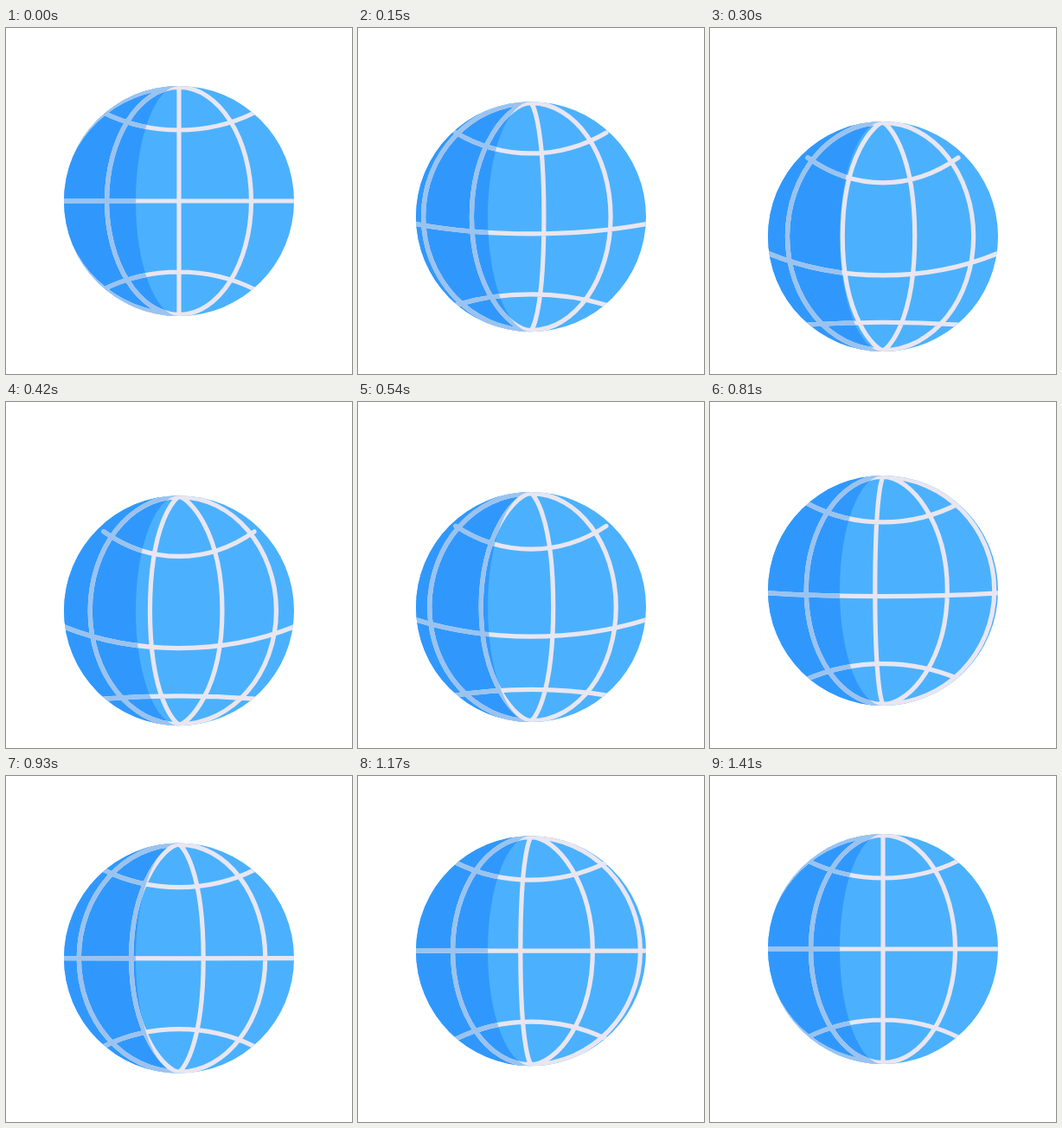
Write an HTML page that moves like this. It is 400 px wide and 400 px high and loops after 3.47 s.

```html
<!DOCTYPE html>
<html lang="en">
<head>
<meta charset="utf-8">
<title>Spinning globe</title>
<style>
  html, body { margin: 0; width: 100%; height: 100%; overflow: hidden; background: #fff; }
  svg { display: block; width: 100%; height: 100%; }
</style>
</head>
<body>
<svg viewBox="0 0 400 400">
  <defs>
    <path id="shade" d="M0-133A133 133 0 0 0 0 133A50 133 0 0 1 0-133Z"/>
    <path id="grid" fill="none" stroke-width="5.2" stroke-linecap="round"/>
    <clipPath id="disc"><circle r="133"/></clipPath>
    <clipPath id="dark"><use href="#shade"/></clipPath>
  </defs>
  <g id="globe">
    <circle r="133" fill="#4bb1fe"/>
    <use href="#shade" fill="#3098fd"/>
    <g clip-path="url(#disc)"><use href="#grid" stroke="#e9e6f1"/></g>
    <g clip-path="url(#dark)"><use href="#grid" stroke="#9ac3f0"/></g>
  </g>
</svg>
<script>
const LOOP = 3470, STEP = 30, DROP_END = 330, PUSH_END = 360, TILT_END = 960, END = 1410;
const PUSH = 0.475, TURNS = 4; // travel in meridian spacings
const globe = document.getElementById('globe');
const grid = document.getElementById('grid');

const clamp = v => Math.min(1, Math.max(0, v));
const span = (t, from, to) => clamp((t - from) / (to - from));
const smooth = u => u * u * (3 - 2 * u);

// Cubic-bezier easing with control points (x1, 0) and (x2, 1)
function ease(u, x1, x2) {
  let lo = 0, hi = 1;
  for (let i = 0; i < 24; i++) {
    const s = (lo + hi) / 2, r = 1 - s;
    const x = 3 * r * r * s * x1 + 3 * r * s * s * x2 + s * s * s;
    if (x < u) lo = s; else hi = s;
  }
  return smooth((lo + hi) / 2);
}

// Horizontal reach of a meridian, u in spacings from the centre
function reach(u) {
  const a = Math.abs(u), d = a - 1;
  return Math.sign(u) * (d <= 0 ? a * 83.5 : 83.5 + 48 * d + 5 * d ** 6);
}

// Narrow meridians meet in a point at the poles, wide ones are elliptical
function meridian(u) {
  const x = reach(u), ry = 131.5, near = Math.min(1, Math.abs(u));
  const h = 0.552 * x * near * near;
  const v = ry * (0.552 + 0.4 * (1 - near));
  return `M0 ${-ry}C${h} ${-ry} ${x} ${-v} ${x} 0C${x} ${v} ${h} ${ry} 0 ${ry}`;
}

function parallel(half, edge, mid) {
  const c = edge + (mid - edge) * 4 / 3, k = half * 0.38;
  return `M${-half} ${edge}C${-k} ${c} ${k} ${c} ${half} ${edge}`;
}

function draw(t) {
  const rise = smooth(span(t, 0, DROP_END));
  const drop = 42 * (rise - ease(span(t, DROP_END, END), 0.36, 0.39));
  const tilt = 1.02 * (rise - smooth(span(t, DROP_END, TILT_END)));
  const travel = PUSH * smooth(span(t, 0, PUSH_END))
               + (TURNS - PUSH) * ease(span(t, PUSH_END, END), 0.17, 0.315);
  const spin = t >= END ? 0 : travel % 1;

  let d = parallel(87, -102 + 11 * tilt, -82 + 20 * tilt)
        + parallel(134, 19 * tilt, 45 * tilt)
        + parallel(87, 102, 82 + 17.5 * tilt);
  for (let k = -2; k < 2; k++) d += meridian(k + spin);

  globe.setAttribute('transform', `translate(200 ${200 + drop})`);
  grid.setAttribute('d', d);
}

const start = performance.now();
function tick() {
  const t = (performance.now() - start) % LOOP;
  draw(Math.floor(t / STEP) * STEP);
  requestAnimationFrame(tick);
}
tick();
</script>
</body>
</html>
```
